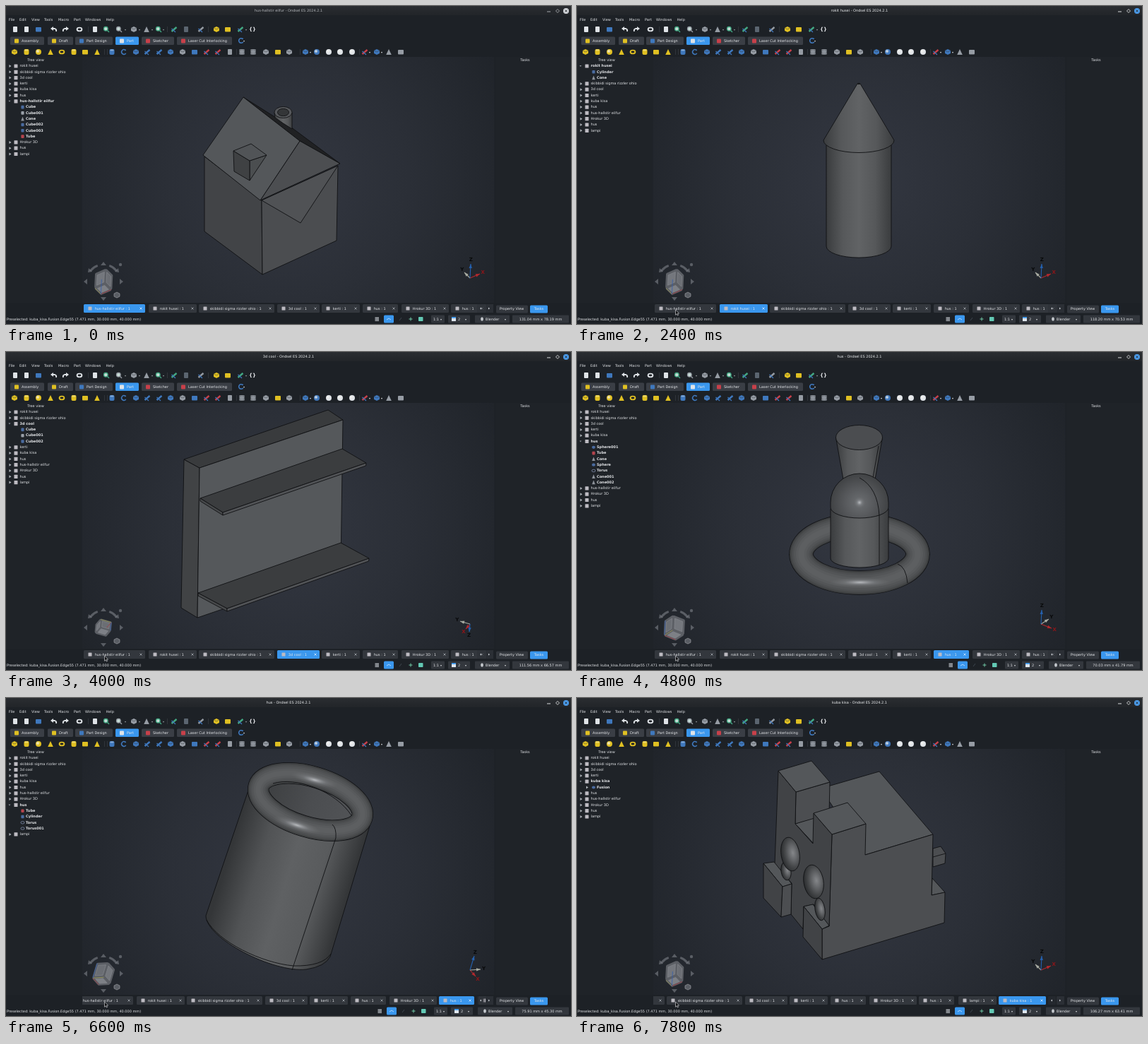
These frames come from a looping animation (800x450 px, 8000 ms). An HTML page with a canvas:

```html
<!DOCTYPE html>
<html lang="en">
<head>
<meta charset="utf-8">
<title>CAD document tabs</title>
<style>
html, body { margin: 0; width: 100%; height: 100%; overflow: hidden; background: #1d2025; }
canvas { display: block; width: 800px; height: 450px; }
</style>
</head>
<body>
<canvas id="stage"></canvas>
<script>
const canvas = document.getElementById('stage');
const dpr = window.devicePixelRatio || 1;
canvas.width = 800 * dpr;
canvas.height = 450 * dpr;
const c = canvas.getContext('2d');

const LOOP = 8000, STEP = 200;
const BLUE = '#3a97ee', EDGE = '#101113', TEXT = '#e3e5e8', BUTTON = '#3a3e45';
const PALETTE = { y: '#e0c022', b: '#3f78bd', w: '#dfe3e7', r: '#c8404a', g: '#969ca4', n: '#43a883', d: '#5b6570' };
const KID_COLORS = { Tube: '#b5444d', Cone: '#8d929a', Cube001: '#9aa0a8' };
const HOUSE = 'hus-hallstir eilfur';

// ---------- drawing helpers ----------
function txt(s, x, y, { color = TEXT, bold = false, align = 'left', size = 5 } = {}) {
  c.font = `${bold ? 'bold ' : ''}${size}px "DejaVu Sans", sans-serif`;
  c.textAlign = align;
  c.textBaseline = 'middle';
  c.fillStyle = color;
  c.fillText(s, x, y);
}

function rect(x, y, w, h, fill, r = 0) {
  c.beginPath();
  c.roundRect(x, y, w, h, r);
  c.fillStyle = fill;
  c.fill();
}

function paint(fill, stroke = EDGE, width = 0.9) {
  if (fill) { c.fillStyle = fill; c.fill(); }
  if (stroke) { c.strokeStyle = stroke; c.lineWidth = width; c.stroke(); }
}

function poly(pts, fill, stroke, width) {
  c.beginPath();
  for (let i = 0; i < pts.length; i += 2) c.lineTo(pts[i], pts[i + 1]);
  c.closePath();
  c.lineJoin = 'round';
  paint(fill, stroke, width);
}

function line(pts, color = EDGE, width = 0.9) {
  c.beginPath();
  for (let i = 0; i < pts.length; i += 2) c.lineTo(pts[i], pts[i + 1]);
  paint(null, color, width);
}

function oval(x, y, rx, ry, fill, stroke = EDGE, rot = 0) {
  c.beginPath();
  c.ellipse(x, y, rx, ry, rot, 0, Math.PI * 2);
  paint(fill, stroke);
}

function curve(d, fill, stroke = EDGE, width = 0.9) {
  const p = new Path2D(d);
  if (fill) { c.fillStyle = fill; c.fill(p); }
  if (stroke) { c.strokeStyle = stroke; c.lineWidth = width; c.stroke(p); }
}

function ramp(x0, y0, x1, y1, ...colors) {
  const g = c.createLinearGradient(x0, y0, x1, y1);
  colors.forEach((col, i) => g.addColorStop(i / (colors.length - 1), col));
  return g;
}

function glow(x, y, r, ...colors) {
  const g = c.createRadialGradient(x, y, 0, x, y, r);
  colors.forEach((col, i) => g.addColorStop(i / (colors.length - 1), col));
  return g;
}

// Ellipse whose radial gradient is squeezed with it.
function blob(x, y, rx, ry, rot, gradient) {
  c.save();
  c.translate(x, y);
  c.rotate(rot);
  c.scale(rx, ry);
  c.beginPath();
  c.arc(0, 0, 1, 0, Math.PI * 2);
  c.fillStyle = gradient;
  c.fill();
  c.restore();
}

function shine(x, y, rx, ry, rot = 0) {
  blob(x, y, rx, ry, rot, glow(0, 0, 1, 'rgba(215,218,222,.75)', 'rgba(160,163,168,.25)', 'rgba(130,130,130,0)'));
}

const round = (x, r) => ramp(x - r, 0, x + r, 0, '#3a3c3e', '#56585a', '#616365', '#56585a', '#3a3c3e');

// Cylinder or cone seen from slightly above; k is the ellipse flattening.
function frustum(x, top, rt, bottom, rb, k, cap = '#303234') {
  c.beginPath();
  c.moveTo(x - rt, top);
  c.lineTo(x - rb, bottom);
  c.ellipse(x, bottom, rb, rb * k, 0, Math.PI, 0, true);
  c.lineTo(x + rt, top);
  paint(round(x, Math.max(rt, rb)));
  oval(x, top, rt, rt * k, cap);
}

// Torus tube built from ever narrower and lighter strokes.
function torus(x, y, rx, ry, tube, rot = 0, from = 0, to = Math.PI * 2) {
  const shades = ['#333537', '#3d3f41', '#464849', '#4d4f51', '#535557', '#595b5d', '#5d5f61'];
  const stroke = (width, color) => {
    c.beginPath();
    c.ellipse(x, y, rx, ry, rot, from, to);
    paint(null, color, width);
  };
  stroke(tube + 1.5, EDGE);
  shades.forEach((color, i) => stroke(tube * Math.cos(i * 0.22), color));
}

// ---------- models ----------
function house() {
  poly([336, 129, 403, 171, 473, 223, 416, 191], '#202123');
  poly([281, 213, 362, 275, 363, 380, 281, 319], '#424447');
  poly([362, 275, 470, 226, 468, 332, 363, 380], '#4b4d50');
  poly([416, 191, 473, 223, 360, 275], '#4c4e51');
  poly([362, 275, 470, 226, 417, 307], '#505255');
  curve('M380 151 L381 158 Q392 166 405 174 L405 151 Z', round(392.5, 13));
  oval(392.5, 150.5, 12.5, 8, '#55575a');
  oval(392.5, 150.5, 8, 5.2, '#343638');
  poly([336, 129, 416, 191, 360, 275, 279, 211], '#54575a');
  poly([345, 219, 369, 211, 345, 247], '#4b4e50');
  poly([322, 205, 345, 219, 345, 247, 323, 234], '#3f4143');
  poly([322, 205, 347, 195, 369, 211, 345, 219], '#515457');
}

function mushroom(x, y, foot) {
  frustum(x, y + 28, 6, foot, 6, 0.25);
  frustum(x, y, 8, y + 31, 32.5, 0.22);
}

function park() {
  frustum(396, 300.5, 144, 333, 144, 0.226, '#2b2c2d');
  frustum(271, 101, 6, 292, 6, 0.3);
  frustum(517, 100, 6, 291, 6, 0.3);
  mushroom(320.5, 199, 293);
  mushroom(464.5, 208, 293);
}

function shelf(x0, y0, x1, y1, x2, y2, x3, y3) {
  poly([x0, y0, x1, y1, x2, y2, x3, y3], '#3b3d3f');
  poly([x0, y0, x3, y3, x3, y3 + 4, x0, y0 + 4], '#46484a');
  poly([x3, y3, x2, y2, x2 - 0.5, y2 + 4, x3, y3 + 4], '#515356');
}

function shelves() {
  poly([252, 152, 274, 164, 271, 376, 248, 362], '#414345');
  poly([252, 152, 456, 82, 477, 96, 274, 164], '#393b3d');
  poly([274, 164, 477, 96, 474, 307, 271, 376], '#55585b');
  shelf(275, 207, 476, 137, 510, 157, 307, 227);
  shelf(272, 341, 474, 270, 514, 292, 313, 363);
}

function pawn() {
  const ring = [400, 286, 82.5, 40.5, 33, 0];
  torus(...ring, Math.PI - 0.02, Math.PI * 2 + 0.02);
  curve('M366.5 121 L378 186 H421 L432.5 121 Z', round(399.5, 33));
  oval(399.5, 121, 33, 17.5, '#4b4d50');
  line([427, 133, 419, 178]);
  curve('M359 222 V292 A41 13 0 0 0 441 292 V222 Z', round(400, 41));
  curve('M359 220 V213 A41 41 0 0 1 441 213 V220 A41 15 0 0 1 359 220 Z', glow(400, 213, 43, '#6c6f72', '#56585b', '#3e4042'));
  shine(400, 213, 8, 8);
  curve('M400 178 Q426 192 428 232 V301', null);
  torus(...ring, 0, Math.PI);
  shine(401, 326, 45, 7);
  curve('M454 300 Q466 304 468 327', null);
}

function barrel() {
  const tilt = 0.297;
  curve('M344 128 L283 308 C283 340 378 389 425 384 Q452 380 459 366 L518 171 Z',
    ramp(317, 219, 485, 271, '#343638', '#515355', '#5f6163', '#595b5d', '#343638'));
  curve('M284 314 C300 345 362 375 407 379 Q448 380 460 362', null);
  oval(431.5, 148.5, 64, 26, ramp(375, 130, 488, 165, '#3f4143', '#4b4d50', '#515356'), null, tilt);
  torus(431, 147, 76.5, 35.5, 29, tilt);
  curve('M378 121 C410 111 466 131 489 166', null);
  shine(437, 116, 34, 8, 0.25);
  shine(412, 180, 36, 8, 0.3);
  curve('M462 179 Q468 184 467 198 L405 385', null);
}

function eye(x, y, rx, ry) {
  blob(x, y, rx, ry, -0.16, glow(0.3, -0.05, 1.25, '#85878a', '#66686b', '#46484a', '#2c2e30'));
  oval(x, y, rx, ry, null, EDGE, -0.16);
}

function cat() {
  const side = '#4c4e51', front = '#414346', top = '#54575a';
  poly([504, 213, 515, 210, 522, 220, 521, 234, 504, 239], side);
  line([504, 225, 522, 220]);
  poly([503, 255, 521, 275, 502, 279], top);
  poly([345, 128, 428, 104, 504, 193, 408, 222], top);
  poly([309, 178, 357, 162, 335, 206], top);
  poly([310, 133, 358, 119, 357, 164, 309, 178], side);
  poly([361, 193, 409, 178, 408, 222, 504, 193, 502, 279, 521, 275, 520, 318, 347, 370, 347, 327, 357, 323], side);
  poly([285, 103, 310, 133, 309, 178, 334, 206, 335, 163, 361, 193, 357, 323, 335, 292, 321, 295,
    320, 327, 303, 306, 304, 262, 280, 235], front);
  poly([285, 103, 332, 89, 358, 119, 310, 133], top);
  poly([335, 163, 383, 148, 409, 178, 361, 193], top);
  poly([264, 234, 279, 232, 304, 263, 291, 267], top);
  poly([264, 234, 291, 267, 289, 310, 264, 283], front);
  poly([291, 267, 304, 263, 303, 306, 289, 310], side);
  poly([321, 295, 334, 292, 357, 322, 347, 327], top);
  poly([321, 295, 347, 327, 347, 370, 320, 338], front);
  eye(296, 245, 7, 13);
  eye(302, 221, 13, 24);
  eye(344, 299, 7, 16);
  eye(335, 260, 14, 24);
}

function rocket() {
  frustum(399, 190, 46, 340, 46, 0.35);
  frustum(399, 110, 2, 190, 50, 0.35);
}

function candle() {
  frustum(399, 300, 85, 318, 85, 0.35);
  frustum(399, 150, 30, 300, 30, 0.35);
}

function rook() {
  frustum(399, 310, 65, 345, 65, 0.35);
  frustum(399, 170, 40, 310, 50, 0.35);
  frustum(399, 130, 54, 170, 54, 0.35);
}

function lamp() {
  frustum(399, 320, 60, 336, 60, 0.35);
  frustum(399, 200, 8, 320, 8, 0.35);
  frustum(399, 125, 32, 215, 75, 0.35);
}

// ---------- documents ----------
// Screen directions of the x, y and z axes.
const ISO = [[14, -6], [-8, -8], [1, -20]];
const FRONT = [[20, 0], [0, -3], [0, -20]];
const CORNER = [[15, 6], [11, -7], [1, -20]];
const UNDER = [[-6, 7], [-14, -4], [-1, 11]];
const LEAN = [[8, 9], [15, -1], [6, -20]];

// Scene order in time; row = place in the tree, dx = shift of the status widgets.
const docs = [
  { name: HOUSE, at: 0, row: 6, kids: 'Cube Cube001 Cone Cube002 Cube003 Tube', draw: house, axes: ISO, size: '131.04 mm x 78.19 mm', dx: 0, scroll: 0, x: 110, w: 87 },
  { name: 'rokit husei', at: 2200, row: 0, kids: 'Cylinder Cone', draw: rocket, axes: ISO, size: '118.20 mm x 70.53 mm', dx: 0, scroll: 0, x: 202, w: 68 },
  { name: 'skibbidi sigma rizzler ohio', at: 2800, row: 1, kids: 'Cylinder Cylinder001 Cone Cone001 Cylinder002 Cylinder003 Cylinder004', draw: park, axes: FRONT, size: '146.41 mm x 109.81 mm', dx: -3, scroll: 0, x: 273, w: 107 },
  { name: '3d cool', at: 3600, row: 2, kids: 'Cube Cube001 Cube002', draw: shelves, axes: UNDER, size: '111.56 mm x 66.57 mm', dx: 0, scroll: 0, x: 384, w: 60 },
  { name: 'kerti', at: 4200, row: 3, kids: 'Cylinder Cylinder001', draw: candle, axes: ISO, size: '92.40 mm x 55.14 mm', dx: 4, scroll: 0, x: 447, w: 54 },
  { name: 'hus', at: 4600, row: 5, kids: 'Sphere001 Tube Cone Sphere Torus Cone001 Cone002', draw: pawn, axes: CORNER, size: '70.03 mm x 41.79 mm', dx: 4, scroll: 0, x: 505, w: 50 },
  { name: 'Hrokur 3D', at: 5400, row: 7, kids: 'Cylinder Cone Tube', draw: rook, axes: ISO, size: '84.62 mm x 50.49 mm', dx: 4, scroll: 0, x: 560, w: 67 },
  { name: 'hus', at: 6200, row: 8, kids: 'Tube Cylinder Torus Torus001', draw: barrel, axes: LEAN, size: '75.91 mm x 45.30 mm', dx: 4, scroll: 17, x: 630, w: 50 },
  { name: 'lampi', at: 7000, row: 9, kids: 'Cylinder Cone', draw: lamp, axes: ISO, size: '98.15 mm x 58.57 mm', dx: 4, scroll: 76, x: 686, w: 54 },
  { name: 'kuba kisa', at: 7400, row: 4, kids: 'Fusion', draw: cat, axes: ISO, size: '106.27 mm x 63.41 mm', dx: 0, scroll: 146, x: 743, w: 67 },
];
const tree = [...docs].sort((a, b) => a.row - b.row);

// ---------- window ----------
// Each entry: x, shape letter, colour letter.
const TOP_ICONS = '13pw 29pw 46bb 68<w 84>w 104ow 126pw 142mn 160mg 181hg 199tg 216mn 238/n 255pd 276/g 298hy 314by 332/n';
const PART_ICONS = '12hy 29cy 46sy 63ty 79oy 96cy 112by 129ty 150cb 167rb 184hb 200/b 217/b 233hb 250hg 267bb 284/r 300/r 317pg 334lg 350lg 368hg 385by 401hg 424hb 440sb 457sw 473sw 490sw 508/r 525hb 542tg 559bg';

function icon(x, y, shape, color) {
  const col = PALETTE[color];
  const shapes = {
    b: () => rect(x - 4, y - 3, 8, 6.5, col, 1),
    p: () => rect(x - 3, y - 4, 6, 8, col, 1),
    s: () => oval(x, y, 4, 4, glow(x - 1, y - 1, 6, '#f4f4f0', col, col), null),
    o: () => { c.beginPath(); c.ellipse(x, y, 3.4, 2.4, 0, 0, 7); paint(null, col, 1.9); },
    r: () => { c.beginPath(); c.arc(x, y, 3.3, 0.6, 5.6); paint(null, col, 1.6); },
    c: () => { rect(x - 3.5, y - 4, 7, 8, col, 2); oval(x, y - 2.5, 2.8, 1, 'rgba(255,255,255,.4)', null); },
    t: () => poly([x, y - 4, x + 3.8, y + 4, x - 3.8, y + 4], col, null),
    h: () => { poly([x - 4, y - 2, x, y - 4, x + 4, y - 2, x + 4, y + 2, x, y + 4, x - 4, y + 2], col, null); line([x - 4, y - 2, x, y, x + 4, y - 2], '#30363d', 0.5); },
    m: () => { c.beginPath(); c.arc(x - 0.7, y - 0.7, 2.8, 0, 7); paint('#c8ded8', col, 1.3); line([x + 1.5, y + 1.5, x + 4, y + 4], col, 1.4); },
    l: () => [-2.5, 0, 2.5].forEach(d => oval(x, y + d, 4, 1.2, col, null)),
    '/': () => { line([x - 3.5, y + 3, x + 3.5, y - 3], col, 2.4); line([x - 3.5, y - 1, x + 2, y + 4], PALETTE.b, 1.2); },
    '<': () => { curve(`M${x - 2} ${y - 1} H${x + 1} Q${x + 4} ${y} ${x + 3} ${y + 3}`, null, col, 1.8); poly([x - 5, y - 1, x - 1, y - 4, x - 1, y + 2], col, null); },
    '>': () => { curve(`M${x + 2} ${y - 1} H${x - 1} Q${x - 4} ${y} ${x - 3} ${y + 3}`, null, col, 1.8); poly([x + 5, y - 1, x + 1, y - 4, x + 1, y + 2], col, null); },
  };
  shapes[shape]();
}

function icons(list, y) {
  for (const item of list.split(' ')) icon(parseInt(item, 10), y, ...item.slice(-2));
}

function docIcon(x, y) {
  rect(x - 2.5, y - 2.6, 5, 5.2, '#bdbbc2', 0.5);
}

function cross(x, y, r = 1.5, color = '#b9bdc3') {
  line([x - r, y - r, x + r, y + r], color, 0.8);
  line([x - r, y + r, x + r, y - r], color, 0.8);
}

function header(doc) {
  const live = doc.at > 2000;
  rect(0, 0, 800, 13, ramp(0, 0, 0, 13, '#2a2d31', '#222529'));
  const title = live ? '#eef0f2' : '#b4b7bb';
  txt(`${doc.name} - Ondsel ES 2024.2.1`, 400, 7, { color: title, align: 'center' });
  line([766, 8, 771, 8], title, 0.9);
  poly([781, 4.5, 783.5, 7, 781, 9.5, 778.5, 7], null, title, 0.8);
  oval(793, 7, 4, 4, live ? '#4b9cec' : '#d3d6da', null);
  cross(793, 7, 1.6, '#22252a');

  const menu = { File: 4, Edit: 19, View: 36, Tools: 54, Macro: 74, Part: 96, Windows: 112, Help: 141.5 };
  for (const name in menu) txt(name, menu[name], 19.5);

  icons(TOP_ICONS, 33);
  [168, 188, 206, 222, 339].forEach(x => txt('▾', x, 34, { size: 4, color: '#9da2a8' }));
  txt('{}', 349, 33, { bold: true, size: 7, align: 'center' });
  [116, 228, 286].forEach(x => rect(x, 29, 0.6, 8, '#40444a'));

  const benches = [['Assembly', 6, 48, 'y'], ['Draft', 59, 36, 'y'], ['Part Design', 98, 53, 'b'], ['Part', 155, 33, 'w'], ['Sketcher', 192, 46, 'r'], ['Laser Cut Interlocking', 242, 78, 'r']];
  for (const [name, x, w, col] of benches) {
    rect(x, 43.5, w, 11.5, name === 'Part' ? BLUE : BUTTON, 1.5);
    rect(x + 6, 46.5, 6, 6, PALETTE[col], 1);
    txt(name, x + 16, 49.5);
  }
  icon(333, 49, 'r', 'b');
  txt('▾', 336, 50, { size: 4 });

  icons(PART_ICONS, 65);
  [139, 143, 326, 416, 500].forEach(x => rect(x, 61, 0.6, 8, '#40444a'));
  [430, 514, 531].forEach(x => txt('▾', x, 66, { size: 4 }));
}

function kidIcon(kid, x, y) {
  const key = Object.keys(KID_COLORS).find(k => kid.startsWith(k));
  const col = KID_COLORS[key] || '#4a6ba0';
  if (key === 'Cone') poly([x, y - 3, x + 2.3, y + 2.7, x - 2.3, y + 2.7], col, null);
  else if (kid.startsWith('Torus')) oval(x, y, 2.6, 1.7, null, '#7583a0');
  else if (/^(Sphere|Fusion)/.test(kid)) oval(x, y, 2.5, 2.1, col, null);
  else rect(x - 2.1, y - 2.3, 4.2, 4.6, col, 1);
}

function panels(doc) {
  rect(0, 72, 107, 348, '#1f2328');
  rect(693, 72, 107, 348, '#1f2328');
  txt('Tree view', 42, 76.5, { align: 'center' });
  txt('Tasks', 735, 76.5, { align: 'center' });

  let y = 85;
  for (const item of tree) {
    const open = item === doc;
    if (open) poly([3.5, y - 1, 6.5, y - 1, 5, y + 1], '#8f959c', null);
    else poly([4.5, y - 2, 7.5, y, 4.5, y + 2], '#b0b5bb', null);
    docIcon(14, y);
    txt(item.name, 19.5, y, { bold: open });
    y += 8.3;
    if (!open) continue;
    for (const kid of item.kids.split(' ')) {
      if (kid === 'Fusion') poly([13, y - 2, 16, y, 13, y + 2], '#b0b5bb', null);
      kidIcon(kid, 23.5, y);
      txt(kid, 28, y, { bold: true });
      y += 8.3;
    }
  }
}

function navCube(axes) {
  const grey = 'rgba(135,139,146,.55)';
  const x0 = 138, y0 = 390, k = 0.52;
  [[113, 390, -1, 0], [163, 390, 1, 0], [138, 365, 0, -1], [138, 414, 0, 1]].forEach(([x, y, dx, dy]) =>
    poly([x + dx * 3, y + dy * 3, x - dx * 2 + dy * 4, y - dy * 2 + dx * 4, x - dx * 2 - dy * 4, y - dy * 2 - dx * 4], grey, null));
  for (const s of [-1, 1]) {
    c.beginPath();
    c.arc(x0, y0, 24, -Math.PI / 2 + s * 0.35, -Math.PI / 2 + s * 0.88, s < 0);
    paint(null, grey, 3);
    poly([x0 + s * 22, 377, x0 + s * 21, 371, x0 + s * 16, 376], grey, null);
  }
  oval(162, 366, 2.2, 2.2, grey, null);
  poly([153, 407, 157, 405, 161, 407, 161, 411, 157, 413, 153, 411], grey, '#a4a7ab', 0.6);

  const [X, Y, Z] = axes;
  const facing = (a, b) => b[0] * a[1] - a[0] * b[1];
  const depth = [facing(Z, Y), facing(X, Z), facing(Y, X)];
  const at = (...s) => [0, 1].map(i => [x0, y0][i] + k * axes.reduce((sum, a, j) => sum + a[i] * s[j], 0));
  const face = (i, r) => [[-r, -r], [r, -r], [r, r], [-r, r]].flatMap(s => at(...s.toSpliced(i, 0, Math.sign(depth[i]) || 1)));
  const sides = [0, 1, 2];
  const body = '#5c5f65';
  sides.forEach(i => poly(face(i, 0.86), body, body, 4));
  sides.forEach(i => poly(face(i, 0.7), ['#6b6e74', '#74777d', '#7d8086'][i], '#84878d', 0.7));
  if (axes === FRONT) txt('FRONT', x0, y0 + 2, { align: 'center', color: '#4a4d53' });

  const base = at(-1, -1, -1);
  line([...base, ...at(1, -1, -1)], '#a03a43', 0.8);
  line([...base, ...at(-1, 1, -1)], '#9a9a55', 0.8);
  line([...base, ...at(-1, -1, 1)], '#345fae', 0.8);
}

function axisCross(axes) {
  const x = 657, y = 385;
  const colors = ['#b3282d', '#a9aca2', '#2460ae'];
  axes.forEach(([dx, dy], i) => {
    const len = Math.hypot(dx, dy), ux = dx / len, uy = dy / len;
    const tx = x + dx, ty = y + dy;
    line([x, y, tx, ty], colors[i], 1.1);
    if (len > 5) poly([tx, ty, tx - ux * 6 - uy * 2.2, ty - uy * 6 + ux * 2.2, tx - ux * 6 + uy * 2.2, ty - uy * 6 - ux * 2.2], colors[i], null);
    txt('XYZ'[i], tx + ux * 4.5, ty + uy * 5.5, { bold: true, size: 7, align: 'center', color: i ? '#08090a' : '#8d1519' });
  });
}

function viewport(doc) {
  rect(107.5, 72, 584, 348, glow(399, 246, 340, '#333741', '#2b2f37', '#20242a'));
  doc.draw();
  navCube(doc.axes);
  axisCross(doc.axes);
}

function tabBar(doc) {
  c.save();
  c.beginPath();
  c.rect(108, 420, 582, 16);
  c.clip();
  for (const item of docs) {
    const x = item.x - doc.scroll, on = item === doc;
    rect(x, 422, item.w, 12, on ? BLUE : '#33373d', 1.5);
    docIcon(x + 9, 428);
    txt(`${item.name} : 1`, x + 15.7, 428.3);
    cross(x + item.w - 6, 428, 1.5, on ? '#d7eaff' : '#a6abb2');
  }
  rect(667, 422, 11, 12, 'rgba(43,47,53,.5)', 1);
  rect(679, 422, 11, 12, '#2b2f35', 1);
  poly([671, 428, 673, 426.5, 673, 429.5], '#c9cdd2', null);
  poly([685, 428, 683, 426.5, 683, 429.5], '#c9cdd2', null);
  c.restore();
  rect(694, 423.5, 45, 11, '#33373d', 1.5);
  txt('Property View', 716, 429, { align: 'center' });
  rect(742, 423.5, 25, 11, BLUE, 1.5);
  txt('Tasks', 754.5, 429, { align: 'center' });
}

function statusBar(doc) {
  txt('Preselected: kuba_kisa.Fusion.Edge55 (7.471 mm, 30.000 mm, 40.000 mm)', 1, 443.3);
  c.save();
  c.translate(doc.dx, 0);
  for (let i = 0; i < 3; i++) rect(522.5, 440.5 + i * 2, 5.5, 1.3, '#b8bdc3');
  rect(535, 437.5, 14, 11, BLUE, 1.5);
  line([539, 444, 542, 442, 545, 444], '#cfe5fb', 0.8);
  line([557, 445, 560, 441], '#47505a', 0.8);
  line([570.5, 443, 575.5, 443], '#6fc6a3', 1);
  line([573, 440.5, 573, 445.5], '#6fc6a3', 1);
  rect(584, 440, 6.5, 6, '#63c9b4', 0.8);
  rect(602, 437.5, 19, 11, '#33373d', 1);
  txt('1:1', 605, 443.3);
  txt('▾', 615, 443.5, { size: 4 });
  rect(626, 437.5, 31, 11, '#33373d', 1);
  rect(631, 440, 6, 6, '#dfe6ee', 0.5);
  rect(631, 440, 6, 1.8, BLUE);
  txt('2', 640, 443.3);
  txt('▾', 650, 443.5, { size: 4 });
  rect(664, 437.5, 49, 11, '#33373d', 1);
  oval(674, 443, 1.9, 2.7, '#c5c9ce', null);
  txt('Blender', 679, 443.3);
  txt('▾', 706, 443.5, { size: 4 });
  rect(717, 437.5, 80 - doc.dx, 11, '#33373d', 1);
  c.restore();
  txt(doc.size, 757 + doc.dx / 2, 443.3, { align: 'center' });
}

function pointer(t) {
  if (t < 200) return;
  const p = Math.min(1, (t - 200) / 1200);
  const ease = 1 - (1 - p) ** 3;
  const rest = t < 2200 ? 137 : 139.5;
  const x = 797 + (rest - 797) * ease;
  const y = 340 + (430 - 340) * ease;
  poly([x, y, x, y + 7.2, x + 1.7, y + 5.6, x + 2.9, y + 8, x + 4, y + 7.4, x + 2.9, y + 5.1, x + 5.1, y + 5], '#0c0d0f', '#e9ebee', 0.6);
}

function render(t) {
  const doc = docs.findLast(d => d.at <= t);
  c.setTransform(dpr, 0, 0, dpr, 0, 0);
  rect(0, 0, 800, 450, '#1d2126');
  viewport(doc);
  panels(doc);
  header(doc);
  tabBar(doc);
  statusBar(doc);
  pointer(t);
}

const start = performance.now();
function tick() {
  const t = (performance.now() - start) % LOOP;
  render(Math.floor(t / STEP) * STEP);
  requestAnimationFrame(tick);
}
tick();
</script>
</body>
</html>
```
